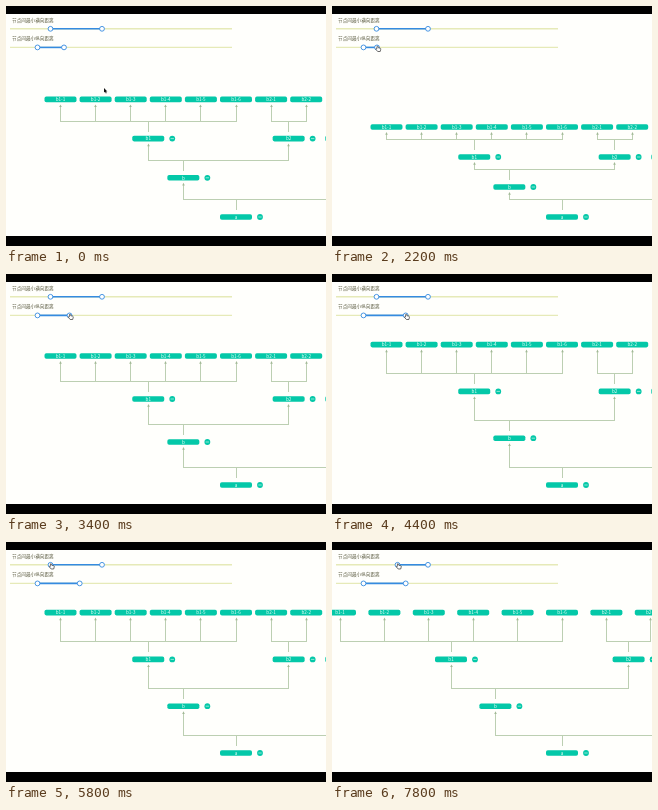
Recreate the animation shown at these times as an HTML page. Size 320 px wide and 240 px high, loop 8 s.

```html
<!DOCTYPE html>
<html lang="zh">
<head>
<meta charset="utf-8">
<style>
html, body { margin: 0; width: 100%; height: 100%; overflow: hidden; background: #000; }
svg { display: block; width: 100vw; height: 100vh; }
text { font-family: "Noto Sans CJK SC", "Noto Sans CJK", "Noto Sans", sans-serif; }
.title { font-size: 4.65px; fill: #5c5c42; }
.label { font-size: 4.6px; fill: #f0fff8; text-anchor: middle; }
.edge { fill: none; stroke: #bccfb2; stroke-width: 1; shape-rendering: crispEdges; }
</style>
</head>
<body>
<svg id="stage" viewBox="0 0 320 240"></svg>
<script>
const LOOP = 8000, STEP = 200, TEAL = '#04c8a8', BLUE = '#358be0';
const stage = document.getElementById('stage');

// Linear interpolation through [time, value] pairs
function track(t, keys) {
  let [t0, v0] = keys[0];
  for (const [t1, v1] of keys) {
    if (t < t1) return t1 > t0 ? v0 + (v1 - v0) * Math.max(0, t - t0) / (t1 - t0) : v0;
    [t0, v0] = [t1, v1];
  }
  return v0;
}

// Value of the last pair already reached
const hold = (t, keys) => keys.filter(k => k[0] <= t).pop()[1];

// Centre of the pixel that holds v
const snap = v => Math.floor(v) + .5;

const edge = d => `<path class="edge" d="${d}"/>`;

function node(x, y, name, button) {
  const box = `<rect x="${x - 16}" y="${y - 2.8}" width="32" height="5.6" rx="1.8" fill="${TEAL}"/>
    <text class="label" x="${x}" y="${y + 1.7}">${name}</text>`;
  return box + (button ? `<circle cx="${x + 24}" cy="${y}" r="2.9" fill="${TEAL}"/>
    <path d="M${x + 22.3} ${y}h3.4" stroke="#c9f5e6" stroke-width=".7"/>` : '');
}

// Stub above a parent, rail, then arrows up to the children
function links(px, py, xs, cy) {
  const rail = snap(py - 17.5), all = [px, ...xs];
  return edge(`M${snap(px)} ${py - 7}V${rail}M${Math.min(...all)} ${rail}H${Math.max(...all)}`) +
    xs.map(snap).map(x => edge(`M${x} ${rail}V${cy + 6.5}`) +
      `<path d="M${x} ${cy + 5}l1.3 2.7h-2.6z" fill="#a2b996"/>`).join('');
}

function tree(dx, dy) {
  const X = i => 230 + i * dx, Y = row => 211 - row * dy;
  const b1 = [-5, -4, -3, -2, -1, 0].map(X), b2 = [1, 2].map(X);
  const leaves = (xs, name) => xs.map((x, i) => node(x, Y(3), `${name}-${i + 1}`)).join('');
  return links(X(0), Y(0), [X(-1.5), X(6)], Y(1)) +
    links(X(-1.5), Y(1), [X(-2.5), X(1.5)], Y(2)) +
    links(X(-2.5), Y(2), b1, Y(3)) + links(X(1.5), Y(2), b2, Y(3)) +
    node(X(0), Y(0), 'a', true) + node(X(-1.5), Y(1), 'b', true) +
    node(X(-2.5), Y(2), 'b1', true) + node(X(1.5), Y(2), 'b2', true) + node(X(3), Y(2), 'b3', true) +
    leaves(b1, 'b1') + leaves(b2, 'b2');
}

function slider(y, title, from, to) {
  const knob = x => `<circle cx="${x}" cy="${y}" r="2.4" fill="#fff" stroke="${BLUE}" stroke-width=".9"/>`;
  return `<text class="title" x="6" y="${y - 7}">${title}</text>
    <path d="M4 ${y}H226" stroke="#e6eab8" stroke-width="1.4"/>
    <path d="M${from} ${y}H${to}" stroke="${BLUE}" stroke-width="1.6"/>` + knob(from) + knob(to);
}

function cursor(x, y, hand) {
  return hand
    ? `<path transform="translate(${x} ${y})" d="M-1 -1.6q.7-.7 1 .2l.2 1.1 2 .5q.8.3.5 1.3l-.5 2h-2.5l-1.9-2.2q0-.8 1-.4z" fill="#fff" stroke="#333" stroke-width=".7"/>`
    : `<path transform="translate(${x} ${y})" d="M0 0v4.6l1.1-.9.8 1.7.8-.4-.8-1.6h1.5z" fill="#111"/>`;
}

function draw(t) {
  const across = track(t, [[6200, 44.5], [7400, 65.5]]);
  const down = track(t, [[1200, 58], [1800, 45], [2200, 45], [3200, 63.5], [3800, 63.5], [4400, 73.7]]);
  const dx = hold(t, [[0, 35.1], [7600, 44.4]]);
  const dy = hold(t, [[0, 39.2], [2200, 30], [3400, 43], [4400, 46.8]]);

  const cx = t < 1200 ? track(t, [[0, 98], [1200, 59]])
    : t < 5800 ? track(t, [[4600, down + 1], [5800, 46]]) : across + 1;
  const cy = track(t, [[0, 82], [1200, 42], [4600, 42], [5800, 23.5]]);
  const hand = t >= 1200 && t <= 4600 || t >= 5600;

  stage.innerHTML = `<rect y="8" width="320" height="222" fill="#fffffc"/>
    <svg y="8" width="320" height="222" viewBox="0 8 320 222">` +
    slider(22.8, '节点间最小横向距离', across, 96) +
    slider(41.4, '节点间最小纵向距离', 31.5, down) +
    tree(dx, dy) + cursor(cx, cy, hand) + '</svg>';
}

let last = -1;
function frame() {
  const t = Math.floor(performance.now() % LOOP / STEP) * STEP;
  if (t !== last) draw(last = t);
  requestAnimationFrame(frame);
}
frame();
</script>
</body>
</html>
```
